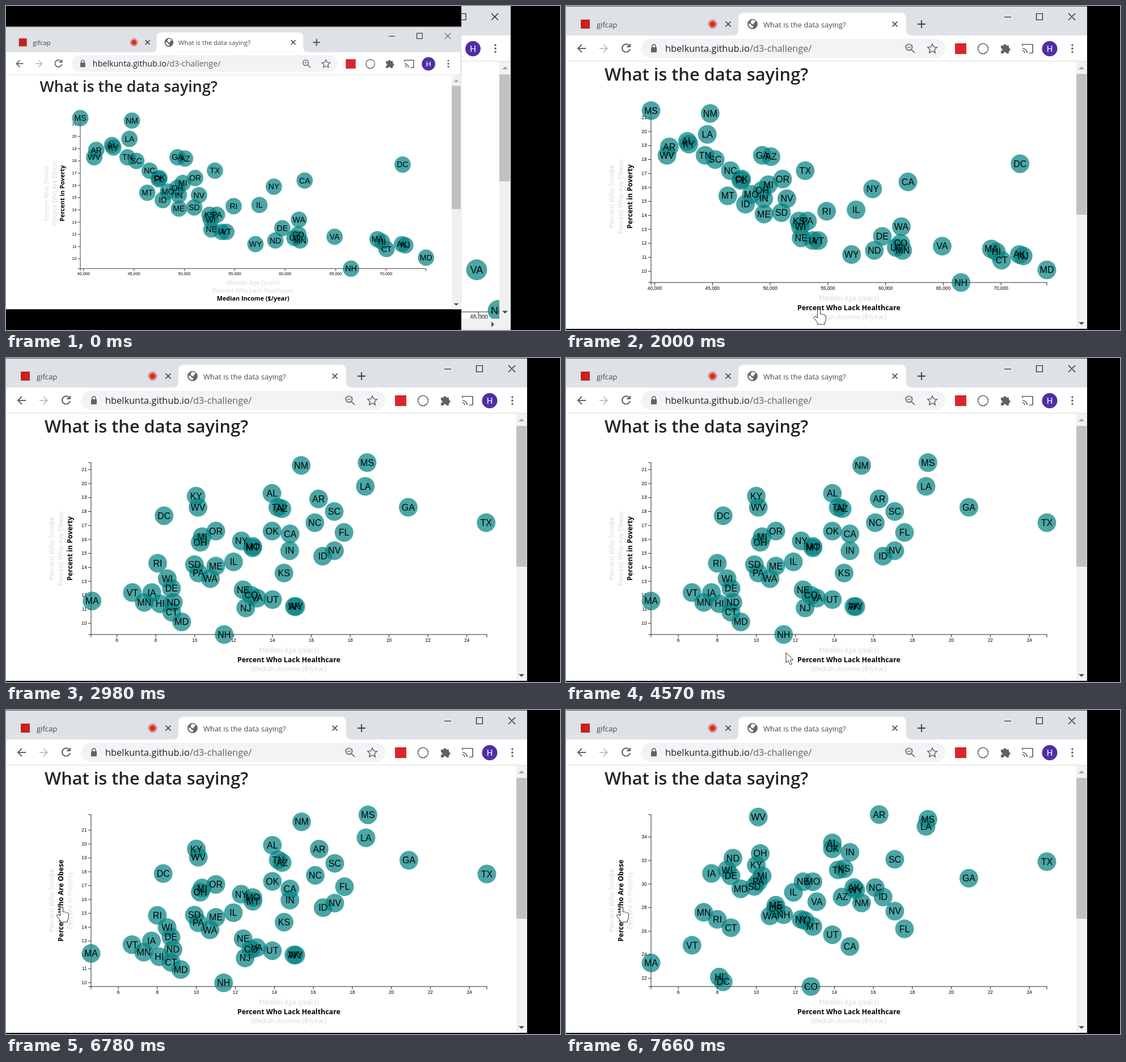
An HTML page for the animation above (8 s loop, 977 by 573 pixels).

```html
<!DOCTYPE html>
<html lang="en">
<head>
<meta charset="utf-8">
<title>What is the data saying?</title>
<style>
  html, body { margin: 0; width: 100%; height: 100%; overflow: hidden; background: #000; }
  svg { display: block; width: 977px; height: 573px; }
  text { font-family: "Open Sans", "Noto Sans", sans-serif; white-space: pre; }
  .icon { fill: none; stroke: #5f6368; stroke-width: 2; }
  .thin { fill: none; stroke: #111; stroke-width: 1.1; }
  .tab { font-size: 13px; fill: #45494d; }
  .axis { fill: none; stroke: #000; stroke-width: .85; }
  .tick text { font: 8.3px "Liberation Sans", Arial, sans-serif; fill: #000; }
  .label { font-size: 12px; fill: #d8d8d8; text-anchor: middle; }
  .label.hover { fill: #808080; }
  .label.active { font-size: 12.4px; font-weight: 700; fill: #000; }
  .dot { fill: #008080; opacity: .7; }
  .abbr { font: 16px "Liberation Sans", Arial, sans-serif; text-anchor: middle; }
  .avatar { font: 15px "Roboto", sans-serif; fill: #fff; text-anchor: middle; }
</style>
</head>
<body>
<svg viewBox="0 0 977 573">
  <defs>
    <clipPath id="plot"><path d="M67 163H900V558H67Z"/></clipPath>
    <clipPath id="strip"><path d="M803 98H870V553H803Z"/></clipPath>
  </defs>

  <!-- edge of a wider window, visible beside the shrunken one -->
  <g id="behind">
    <path d="M803 0H890V573H803Z" fill="#fff"/>
    <path d="M803 0H890V52H803Z" fill="#dee1e6"/>
    <path d="M803 97.5H890" stroke="#dadce0"/>
    <path class="thin" d="M800 13.500H811V24.500H800M856 13l12 12m0-12l-12 12"/>
    <circle cx="823.500" cy="75.500" r="13.500" fill="#512da8"/>
    <text class="avatar" x="823.500" y="81">H</text>
    <path d="M863 69v.1m0 6v.1m0 6v.1" stroke="#5f6368" stroke-width="3.600" stroke-linecap="round"/>
    <g clip-path="url(#strip)">
      <path class="axis" d="M803 541H870M833 541v6"/>
      <g class="tick"><text x="819" y="554" style="font-size:10px">65,000</text></g>
      <circle class="dot" cx="830" cy="466.500" r="18.500"/>
      <circle class="dot" cx="868" cy="538.500" r="18.500"/>
      <text class="abbr" x="830" y="473" style="font-size:18px">VA</text>
      <text class="abbr" x="868" y="545" style="font-size:18px">NH</text>
    </g>
    <path d="M870 98H890V573H803V553H870Z" fill="#f1f1f1"/>
    <path d="M870 121H889V310H870Z" fill="#c1c1c1"/>
    <path d="M875 112l5-5 5 5Z" fill="#a3a3a3"/>
    <path d="M875 539l5 5 5-5ZM856 558l5 5-5 5Z" fill="#505050"/>
  </g>

  <g id="window">
    <path d="M0 0H919V571H0Z" fill="#fff"/>
    <path d="M0 0H919V52H0Z" fill="#dee1e6"/>
    <path d="M0 0H919V1H0Z" fill="#555"/>
    <path d="M294 52q10 0 10-10V22q0-10 10-10H590q10 0 10 10V42q0 10 10 10Z" fill="#fff"/>

    <path d="M26 24H42V40H26Z" fill="#c5221f"/>
    <text class="tab" x="54" y="37.500">gifcap</text>
    <circle cx="258.500" cy="32" r="5.500" fill="#d93025"/>
    <circle cx="258.500" cy="32" r="7.300" fill="none" stroke="#d93025"/>
    <g class="icon" style="stroke:#3c4043;stroke-width:1.700">
      <path d="M281.500 27.500l9 9m0-9l-9 9M575.500 27.500l9 9m0-9l-9 9"/>
      <path d="M627 25v14m-7-7h14" stroke-width="2"/>
    </g>
    <circle cx="329" cy="32" r="9" fill="#5f6368"/>
    <path d="M322 31q4 0 5 3t3 1-1 4q-7-1-7-8M328 25q5-1 7 3-3 0-4 3t-4 0 1-6" fill="#fff"/>
    <text class="tab" x="348" y="37.500">What is the data saying?</text>
    <path class="thin" d="M773 19.500h12M829.500 13.500h11v11h-11ZM886 13l12 12m0-12l-12 12"/>

    <rect x="133" y="58" width="536" height="34" rx="17" fill="#f1f3f4"/>
    <g class="icon">
      <path d="M35 75H21m7-7l-7 7 7 7"/>
      <path d="M59 75h14m-7-7l7 7-7 7" stroke="#bdc1c6"/>
      <path d="M112 71a7 7 0 1 0 .8 5M113 67v5h-6"/>
      <path d="M152 74v-3a3 3 0 0 1 6 0v3" stroke-width="1.600"/>
      <path d="M150 73h10v9h-10Z" fill="#5f6368" stroke="none"/>
      <circle cx="605" cy="73" r="5.500" stroke-width="1.700"/>
      <path d="M609 77l6 6M602.500 73h5" stroke-width="1.700"/>
      <path d="M646 67l2.500 5.400 5.700.6-4.200 4 1.200 5.800-5.200-3-5.200 3 1.200-5.800-4.200-4 5.700-.6Z" stroke-width="1.500"/>
      <circle cx="735.500" cy="75.500" r="9" stroke-width="1.500"/>
      <path d="M805 71v-3h18v15h-6M805 75a8 8 0 0 1 8 8m-8-4a4 4 0 0 1 4 4" stroke-width="1.700"/>
    </g>
    <path d="M686 66H706V85H686Z" fill="#d9262c"/>
    <path d="M767 70h4.500a2.500 2.500 0 1 1 5 0h4.500v4.500a2.500 2.500 0 1 1 0 5v4.500h-4.500a2.500 2.500 0 0 0-5 0h-4.500v-4.500a2.500 2.500 0 0 0 0-5Z" fill="#5f6368"/>
    <text x="175" y="81" font-size="16.400" fill="#202124">hbelkunta.github.io<tspan fill="#5f6368">/d3-challenge/</tspan></text>
    <circle cx="853" cy="75.500" r="13.500" fill="#512da8"/>
    <text class="avatar" x="853" y="81">H</text>
    <path d="M893 69v.1m0 6v.1m0 6v.1" stroke="#5f6368" stroke-width="3.600" stroke-linecap="round"/>
    <path d="M0 97.500H919" stroke="#dadce0"/>

    <path d="M900 98H919V571H900Z" fill="#f1f1f1"/>
    <path d="M900 120H918V369H900Z" fill="#c1c1c1"/>
    <path d="M904 112l5-5 5 5Z" fill="#a3a3a3"/>
    <path d="M904 559l5 5 5-5Z" fill="#505050"/>

    <text x="68" y="132" font-size="30.800" font-weight="600" fill="#212529">What is the data saying?</text>
    <g id="chart" clip-path="url(#plot)">
      <path class="axis" d="M145 185H150V489H145M150 494V489H848V494"/>
    </g>
  </g>

  <g id="cursor" fill="#fff" stroke="#333" stroke-linejoin="round">
    <path id="arrow" d="M0 0V18l4-4 3.500 7.500 3-1.500-3.300-7H13Z"/>
    <path id="hand" d="M-2.500 2Q0-1.500 2.500 2V9q2.500-1.200 3.800.8 2.500-1 3.600 1 2.400-.4 2.400 2.200V18q0 3-2 6V27H-2.500V25q-1-3-4.500-7-2.600-3.500-.5-4.500t5 2.500Z"/>
  </g>
</svg>

<script>
const LOOP = 8000, CAPTURE = 97.33, MOVE = 1000;
const OPENED = 100, X_CLICK = 1976, Y_CLICK = 6545;

const states = ('AL AK AZ AR CA CO CT DE DC FL GA HI ID IL IN IA KS KY LA ME MD MA MI MN MS MO ' +
  'MT NE NV NH NJ NM NY NC ND OH OK OR PA RI SC SD TN TX UT VT VA WA WV WI WY').split(' ');
const income = [42830, 71583, 50068, 41262, 61933, 61303, 70048, 59716, 71648, 47463, 49321, 69592, 47861,
  57444, 49446, 53712, 52504, 42958, 44555, 49462, 73971, 69160, 49847, 61481, 39680, 48363, 46328, 52686,
  51450, 66532, 71919, 44803, 58878, 46556, 59029, 49308, 47529, 51075, 53234, 54891, 45238, 50979, 44361,
  53035, 60922, 54166, 64902, 61366, 41059, 52622, 57055];
const healthcare = [13.9, 15, 14.4, 16.3, 14.8, 12.8, 8.7, 8.7, 8.3, 17.6, 20.9, 8.1, 16.5, 11.9, 14.8, 7.7,
  14.5, 10, 18.7, 11, 9.2, 4.6, 10.3, 7.3, 18.8, 12.9, 12.9, 12.4, 17.1, 11.4, 12.5, 15.4, 12.3, 16.1, 8.8,
  10.2, 13.9, 11, 10.1, 8, 17.1, 9.9, 14.2, 24.9, 13.9, 6.7, 13.1, 10.7, 10.1, 8.5, 15.1];
const poverty = [19.3, 11.2, 18.2, 18.9, 16.4, 12, 10.8, 12.5, 17.7, 16.5, 18.3, 11.4, 14.8, 14.4, 15.2, 12.2,
  13.6, 19.1, 19.8, 14.1, 10.1, 11.6, 16.2, 11.5, 21.5, 15.5, 15.4, 12.4, 15.2, 9.2, 11.1, 21.3, 15.9, 17.2,
  11.5, 15.8, 16.6, 16.6, 13.6, 14.3, 18, 14.2, 18.3, 17.2, 11.7, 12.2, 11.8, 13.2, 18.3, 13.2, 11.2];
const obesity = [33.5, 29.7, 28.9, 35.9, 24.7, 21.3, 26.3, 30.7, 21.7, 26.2, 30.5, 22.1, 28.9, 29.3, 32.7,
  30.9, 31.3, 31.6, 34.9, 28.2, 29.6, 23.3, 30.7, 27.6, 35.5, 30.2, 26.4, 30.2, 27.7, 27.4, 26.9, 28.4, 27,
  29.7, 32.2, 32.6, 33, 27.9, 30.2, 27, 32.1, 29.8, 31.2, 31.9, 25.7, 24.8, 28.5, 27.3, 35.7, 31.2, 29.5];

const $ = id => document.getElementById(id);
const lerp = (a, b, p) => a + (b - a) * p;
const clamp = v => Math.max(0, Math.min(1, v));
const ease = v => (v = clamp(v)) < .5 ? 4 * v ** 3 : 1 - 4 * (1 - v) ** 3;
const smooth = v => v * v * (3 - 2 * v);

function add(parent, tag, attrs, text) {
  const node = document.createElementNS('http://www.w3.org/2000/svg', tag);
  for (const name in attrs) node.setAttribute(name, attrs[name]);
  if (text) node.textContent = text;
  return parent.appendChild(node);
}

function scale(data, from, to) {
  const lo = Math.min(...data), hi = Math.max(...data);
  return v => lerp(from, to, (v - lo) / (hi - lo));
}
const xScales = [scale(income, 150, 848), scale(healthcare, 150, 848)];
const yScales = [scale(poverty, 489, 185), scale(obesity, 489, 185)];
const between = (scales, a, b, p) => lerp(scales[0](a), scales[1](b), p);

const chart = $('chart');
const ticks = [];
function addTicks(horizontal, entering, first, last, step) {
  for (let value = first; value <= last; value += step) {
    const node = add(chart, 'g', { class: 'tick' });
    add(node, 'path', { class: 'axis', d: horizontal ? 'M0 489v5' : 'M150 0h-5' });
    add(node, 'text', horizontal ? { y: 502.3, 'text-anchor': 'middle' }
      : { x: 142.6, y: 2.7, 'text-anchor': 'end' }, value.toLocaleString('en-US'));
    ticks.push({ node, value, horizontal, entering });
  }
}
addTicks(true, false, 40000, 70000, 5000);
addTicks(true, true, 6, 24, 2);
addTicks(false, false, 10, 21, 1);
addTicks(false, true, 22, 34, 2);

function addLabel(text, horizontal, index, halfLength) {
  const x = horizontal ? 498.8 : 81 + 16 * index;
  const y = horizontal ? 517 + 16.3 * index : 337;
  const node = add(chart, 'text', { dy: 4.4,
    transform: `translate(${x} ${y})` + (horizontal ? '' : ' rotate(-90)') }, text);
  const w = horizontal ? halfLength : 8, h = horizontal ? 8 : halfLength;
  const hit = c => c && Math.abs(c.x - x) < w && Math.abs(c.y - y) < h;
  return { node, horizontal, index, hit };
}
const labels = [
  addLabel('Median Age (years)', true, 0, 53),
  addLabel('Percent Who Lack Healthcare', true, 1, 80),
  addLabel('Median Income ($/year)', true, 2, 66),
  addLabel('Percent Who Smoke', false, 0, 55),
  addLabel('Percent Who Are Obese', false, 1, 66),
  addLabel('Percent in Poverty', false, 2, 50)
];

const dots = states.map(() => add(chart, 'circle', { class: 'dot', r: 16.5 }));
const abbrs = states.map(s => add(chart, 'text', { class: 'abbr', dy: 5.7 }, s));

// Pointer visits as [time, x, y]; the pointer is hidden between them.
const visits = [
  [[100, 880, 550], [850, 462, 516], [950, 462, 516], [1250, 407, 532], [1620, 446, 536], [2700, 446, 536]],
  [[4570, 388, 521], [4760, 388, 521]],
  [[5460, 470, 524], [6310, 98, 348], [LOOP, 98, 348]]
];
function pointer(t) {
  const path = visits.find(v => t >= v[0][0] && t < v[v.length - 1][0]);
  if (!path) return null;
  const i = path.findIndex(key => key[0] > t);
  const [t0, x0, y0] = path[i - 1], [t1, x1, y1] = path[i];
  const p = smooth((t - t0) / (t1 - t0));
  return { x: lerp(x0, x1, p), y: lerp(y0, y1, p) };
}

const show = (node, on) => node.style.display = on ? '' : 'none';

function draw() {
  const t = performance.now() % LOOP;
  const shot = Math.floor((t - 63) / CAPTURE) * CAPTURE + 63;
  const px = ease((shot - X_CLICK) / MOVE), py = ease((shot - Y_CLICK) / MOVE);

  const small = t < OPENED;
  show($('behind'), small);
  $('window').setAttribute('transform', small ? 'matrix(.8735 0 0 .8755 0 36.3)' : '');

  for (const { node, value, horizontal, entering } of ticks) {
    const p = horizontal ? px : py;
    const at = between(horizontal ? xScales : yScales, value, value, p);
    node.setAttribute('transform', horizontal ? `translate(${at} 0)` : `translate(0 ${at})`);
    node.setAttribute('opacity', entering ? p : 1 - p);
  }

  states.forEach((_, i) => {
    const x = between(xScales, income[i], healthcare[i], px);
    const y = between(yScales, poverty[i], obesity[i], py);
    dots[i].setAttribute('cx', x);
    dots[i].setAttribute('cy', y);
    abbrs[i].setAttribute('x', x);
    abbrs[i].setAttribute('y', y);
  });

  const cursor = pointer(t);
  let over = false;
  for (const { node, horizontal, index, hit } of labels) {
    const active = index === (t < (horizontal ? X_CLICK : Y_CLICK) ? 2 : 1);
    const hover = hit(cursor);
    over = over || hover;
    node.setAttribute('class', 'label' + (active ? ' active' : hover ? ' hover' : ''));
  }

  show($('cursor'), cursor);
  if (cursor) $('cursor').setAttribute('transform', `translate(${cursor.x} ${cursor.y})`);
  show($('hand'), over);
  show($('arrow'), !over);
  requestAnimationFrame(draw);
}
draw();
</script>
</body>
</html>
```
